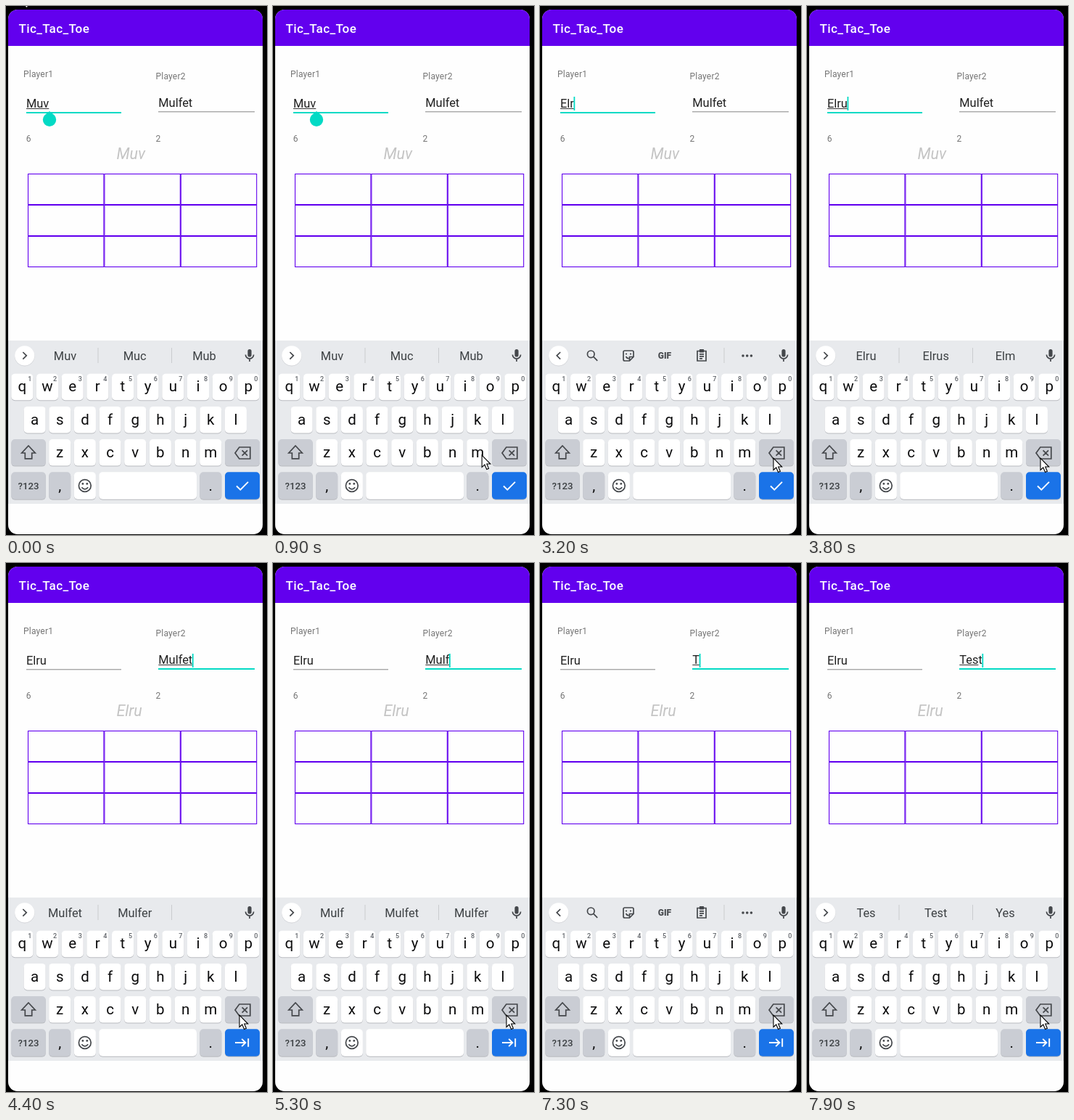
These frames come from a looping animation (360 px wide and 729 px high, 8 s). An HTML page:

```html
<!DOCTYPE html>
<html lang="en">
<head>
<meta charset="utf-8">
<title>Tic_Tac_Toe</title>
<style>
html, body { margin: 0; width: 100%; height: 100%; overflow: hidden; background: #000; }
svg { display: block; width: 360px; height: 729px; font-family: Roboto, sans-serif; }
.title { font-size: 17.1px; font-weight: 500; letter-spacing: .02em; fill: #fff; }
.label { font-size: 12px; letter-spacing: .2px; fill: #757575; }
.field { font-size: 16.4px; fill: #202020; }
.turn { font-size: 21.4px; font-style: italic; fill: #c4c4c4; }
.key { font-size: 20.5px; fill: #0c0c0d; text-anchor: middle; }
.digit { font-size: 9px; font-weight: 500; fill: #5f6368; text-anchor: middle; }
.word { font-size: 16.4px; fill: #3c4043; text-anchor: middle; }
.mode { font-size: 13.2px; font-weight: 500; fill: #3c4043; text-anchor: middle; }
.gif { font-size: 12px; font-weight: 900; fill: #4a4d51; text-anchor: middle; }
.icon { fill: none; stroke: #44474b; stroke-width: 1.7; }
.solid { fill: #44474b; }
</style>
</head>
<body>
<svg id="stage" viewBox="0 0 360 729">
  <defs><clipPath id="screen"><rect x="3" y="5" width="351" height="723" rx="13"/></clipPath></defs>
  <g id="app" clip-path="url(#screen)">
    <rect width="360" height="729" fill="#fefefe"/>
    <rect width="360" height="55" fill="#6200ee"/>
    <text class="title" x="17.5" y="37">Tic_Tac_Toe</text>
    <text class="label" x="24" y="98">Player1</text>
    <text class="label" x="206.5" y="101">Player2</text>
    <text class="label" x="27.7" y="187">6</text>
    <text class="label" x="206.5" y="187">2</text>
    <rect y="461" width="360" height="225" fill="#e8eaed"/>
  </g>
</svg>
<script>
const LOOP = 8000, TEAL = '#03dac5';
const ONE = 'Muv', TWO = 'Mulfet', NEW = 'Elru';

// time, player 1, player 2, focused field, underlined letters
const EDITS = [
  [0, ONE, TWO, 0, 3],
  [1700, 'Mu', TWO, 0, 2],
  [2000, '', TWO, 0, 0],
  [2900, 'E', TWO, 0, 1],
  [3000, 'El', TWO, 0, 2],
  [3200, 'Elr', TWO, 0, 3],
  [3400, NEW, TWO, 0, 3],
  [3700, NEW, TWO, 0, 4],
  [4100, NEW, TWO, 1, 6],
  [5100, NEW, 'Mulfe', 1, 5],
  [5300, NEW, 'Mulf', 1, 4],
  [5500, NEW, 'Mul', 1, 3],
  [5600, NEW, 'Mu', 1, 2],
  [5800, NEW, 'M', 1, 1],
  [6100, NEW, '', 1, 0],
  [7300, NEW, 'T', 1, 1],
  [7500, NEW, 'Te', 1, 2],
  [7800, NEW, 'Tes', 1, 3],
  [7900, NEW, 'Test', 1, 3]
];
const CARET = [
  [0, 0], [200, 1], [700, 0], [1200, 1], [2300, 0], [2800, 1],
  [4700, 0], [5100, 1], [6600, 0], [7000, 1]
];
// an empty list shows the tool icons
const WORDS = [
  [0, 'Muv Muc Mub'],
  [1800, 'Mu Much Must'],
  [2000, ''],
  [3300, 'Elr Elru Elm'],
  [3700, 'Elru Elrus Elm'],
  [4400, 'Mulfet Mulfer'],
  [5100, 'Mulfe Mulfet Mulfer'],
  [5300, 'Mulf Mulfet Mulfer'],
  [5500, 'Mul Mule Multi'],
  [5600, 'Mu Much Must'],
  [5900, 'M My Me'],
  [6200, ''],
  [7400, 'T They Thanks'],
  [7600, 'Te The Thanks'],
  [7900, 'Tes Test Yes']
];
const POINTER = [
  [300, 21, -17], [400, 36, 20], [600, 150, 330], [800, 272, 600],
  [900, 288, 619], [1000, 302, 623], [1200, 319, 613], [1300, 330, 609],
  [1400, 336, 608], [1600, 336, 608], [1800, 333, 613],
  [2000, 320.5, 623], [2300, 322, 623]
];

const NS = 'http://www.w3.org/2000/svg';
const app = document.getElementById('app');
function add(tag, attrs, parent = app, text = '') {
  const el = document.createElementNS(NS, tag);
  for (const name in attrs) el.setAttribute(name, attrs[name]);
  el.textContent = text;
  parent.append(el);
  return el;
}
const set = (el, attrs) => { for (const name in attrs) el.setAttribute(name, attrs[name]); };
const write = (cls, x, y, text, parent) => add('text', { class: cls, x, y }, parent, text);
const icon = (d, parent, more) => add('path', { class: 'icon', d, ...more }, parent);
const show = (el, on) => el.setAttribute('visibility', on ? 'visible' : 'hidden');
const bar = (x, parent) =>
  add('rect', { x, y: 471, width: 1, height: 21, fill: '#c9cbce' }, parent);

// board
for (let i = 0; i < 9; i++) {
  add('rect', {
    x: 30.5 + 105.4 * (i % 3), y: 231.5 + 43 * Math.floor(i / 3),
    width: 104.4, height: 42, fill: 'none', stroke: '#6200ee', 'stroke-width': 1.1
  });
}

// input fields
const fields = [[28, 140, 146], [210.3, 139, 145]].map(([x, y, lineY], i) => ({
  x, lineY,
  text: write('field', x, y, ''),
  line: add('rect', { x: i ? 210 : 28, y: lineY, width: i ? 133 : 131 })
}));
const compose = add('rect', { height: 1, fill: '#333' });
const caret = add('rect', { y: 125, width: 1.8, height: 19, fill: TEAL });
const handle = add('path', { d: 'M60 145L66.5 150.3A9.2 9.2 0 1 1 53.5 150.3Z', fill: TEAL });
const turn = write('turn', 152.5, 211, '');

// keyboard
function key(x, y, width, fill = '#fff', height = 36.5) {
  add('rect', { x, y: y + 1, width, height, rx: 5, fill: '#b9bbc0' });
  add('rect', { x, y, width, height, rx: 5, fill });
}
const GREY = '#cacdd4';
['qwertyuiop', 'asdfghjkl', 'zxcvbnm'].forEach((row, r) => {
  const left = [7.3, 24.6, 59.2][r], top = 506.7 + 45.2 * r;
  [...row].forEach((letter, i) => {
    const x = left + 34.67 * i;
    key(x, top, 30);
    write('key', x + 15, top + 24.7, letter);
    if (r === 0) write('digit', x + 25.6, 517, (i + 1) % 10);
  });
});
key(7.3, 597.1, 47.5, GREY);
key(302, 597.1, 48, GREY);
key(7.3, 642.3, 47.5, GREY, 37.5);
key(59.2, 642.3, 30, GREY, 37.5);
key(93.9, 642.3, 30, '#fff', 37.5);
key(128.2, 642.3, 134.8, '#fff', 37.5);
key(267.3, 642.3, 30, GREY, 37.5);
key(302, 642.3, 48, '#1a73e8', 37.5);
write('mode', 31, 666, '?123');
write('key', 74.2, 668, ',');
write('key', 282.3, 668, '.');
icon('M31 606L40.3 616H35.7V623.8H26.3V616H21.7Z');
icon('M316 616L321.8 608H336.8V624H321.8ZM325.6 612.3L333 619.7M333 612.3L325.6 619.7');
icon('M117.2 661a8.4 8.4 0 1 1 -16.8 0a8.4 8.4 0 1 1 16.8 0M104.4 663.2Q108.8 668.6 113.2 663.2');
[105.9, 111.8].forEach(cx => add('circle', { class: 'solid', cx, cy: 658.4, r: 1.4 }));
const white = { style: 'stroke:#fff;stroke-width:1.9' };
const check = icon('M318 661.5L323.3 666.6L334 655.8', app, white);
const tab = icon('M316 661H330M325.2 655.8L330.4 661L325.2 666.2M334.2 655.2V666.8', app, white);

// suggestion strip
add('circle', { cx: 25.7, cy: 482.6, r: 13.8, fill: '#d0d2d6' });
add('circle', { cx: 25.7, cy: 481.8, r: 13.6, fill: '#fff' });
const chevron = icon('');
add('rect', { class: 'solid', x: 333.4, y: 473, width: 5.2, height: 10.5, rx: 2.6 });
icon('M330.4 480.5a5.6 5.6 0 0 0 11.2 0M336 486V490');
const strip = add('g', {});
bar(126.5, strip);
bar(228, strip);
const words = [81.5, 177.7, 273.5].map(x => write('word', x, 488, '', strip));

const tools = add('g', {});
icon('M75 479.8a4.8 4.8 0 1 1 -9.6 0a4.8 4.8 0 1 1 9.6 0M73.8 483.4L79.2 488.8', tools);
icon('M117 475H127Q129 475 129 477V483.5L123.5 489H117Q115 489 115 487V477Q115 475 117 475ZM129 483.5H123.5V489M118.5 483Q120 486 122.5 485.5', tools);
[119, 125].forEach(cx => add('circle', { class: 'solid', cx, cy: 479.5, r: 1.1 }, tools));
write('gif', 172, 486, 'GIF', tools);
icon('M217 475.5H229V489H217ZM220 479.8H226M220 482.8H226M220 485.8H224', tools);
add('rect', { class: 'solid', x: 219.8, y: 473, width: 6.4, height: 4.4, rx: 1 }, tools);
bar(253.5, tools);
[280, 285.7, 291.4].forEach(cx => add('circle', { class: 'solid', cx, cy: 482, r: 1.8 }, tools));

const pointer = add('path', {
  d: 'M0 0V16.5L3.8 13L6.6 19.5L9.4 18.3L6.7 12H11.7Z',
  fill: '#fff', stroke: '#000', 'stroke-width': 1.1
}, document.getElementById('stage'));

const stepAt = (table, t) => table.findLast(row => row[0] <= t);
function pointAt(t) {
  const next = POINTER.findIndex(row => row[0] > t);
  if (next === 0) return POINTER[0].slice(1);
  if (next < 0) return POINTER[POINTER.length - 1].slice(1);
  const [t0, x0, y0] = POINTER[next - 1], [t1, x1, y1] = POINTER[next];
  const k = (t - t0) / (t1 - t0);
  return [x0 + (x1 - x0) * k, y0 + (y1 - y0) * k];
}

function draw(t) {
  const [, first, second, focus, marked] = stepAt(EDITS, t);
  fields.forEach((field, i) => {
    const active = i === focus;
    field.text.textContent = i ? second : first;
    set(field.line, {
      y: field.lineY + (active ? 0 : .3), height: active ? 2 : 1,
      fill: active ? TEAL : '#858585'
    });
  });
  const { x, text } = fields[focus];
  const length = text.textContent.length;
  set(compose, {
    x, y: focus ? 140 : 141,
    width: marked && length ? text.getSubStringLength(0, Math.min(marked, length)) : 0
  });
  set(caret, { x: x + (length ? text.getComputedTextLength() - .4 : .1) });
  show(caret, stepAt(CARET, t)[1]);
  show(handle, t < 1700);
  turn.textContent = t < 4100 ? ONE : NEW;

  const list = stepAt(WORDS, t)[1];
  show(strip, list);
  show(tools, !list);
  words.forEach((word, i) => { word.textContent = list.split(' ')[i] || ''; });
  set(chevron, { d: list ? 'M23.3 477L28.2 481.8L23.3 486.6' : 'M28.1 477L23.2 481.8L28.1 486.6' });
  show(check, t < 4400);
  show(tab, t >= 4400);
  set(pointer, { transform: `translate(${pointAt(t)})` });
}

const start = performance.now();
function tick() {
  draw((performance.now() - start) % LOOP);
  requestAnimationFrame(tick);
}
tick();
</script>
</body>
</html>
```
